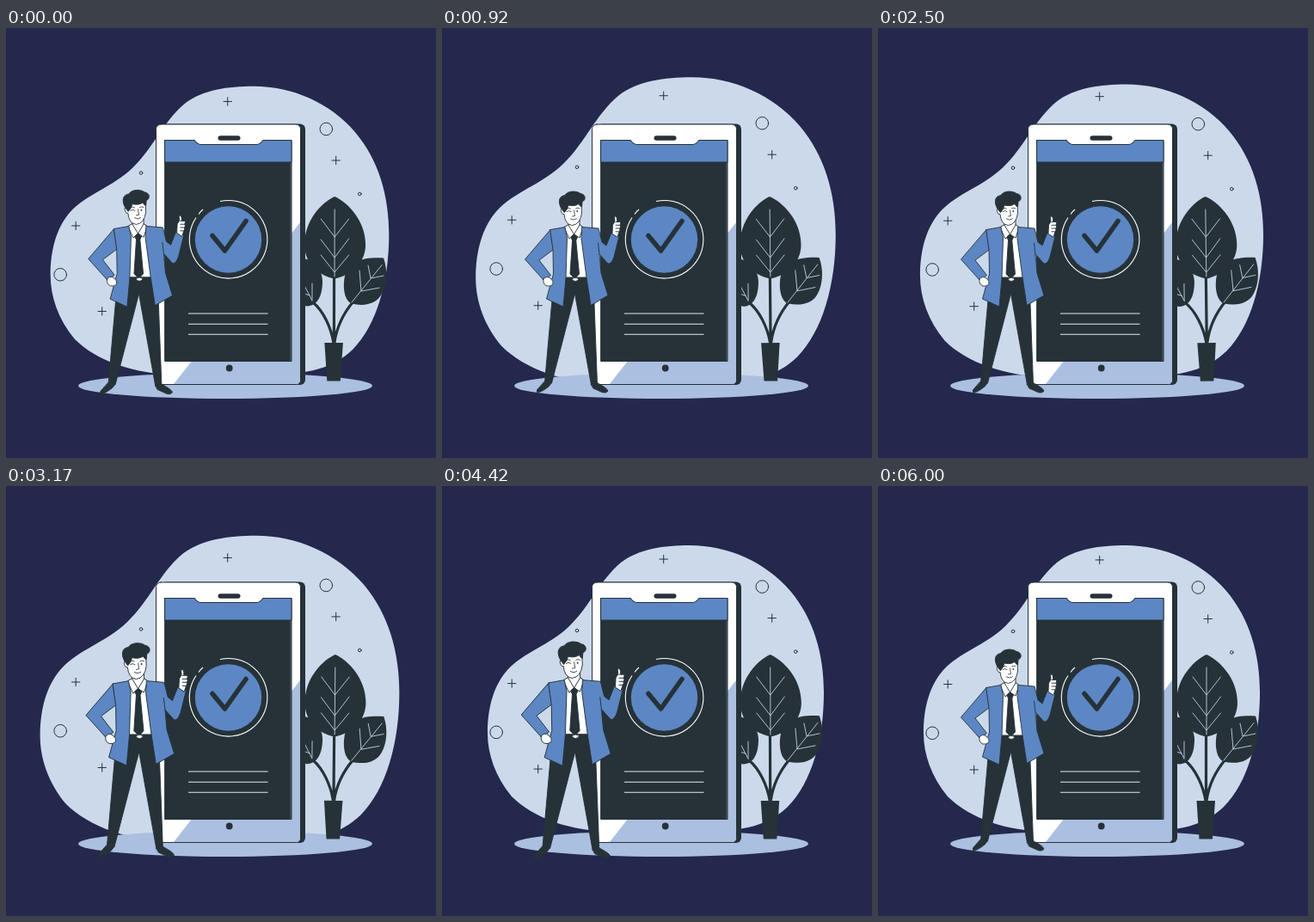
Animation of 500 by 500 pixels, one loop 6.04 s. Source, as an HTML page:

```html
<!DOCTYPE html>
<html lang="en">
<head>
<meta charset="utf-8">
<title>Payment confirmed</title>
<style>
  html, body { margin: 0; width: 100%; height: 100%; overflow: hidden; background: #24284c; }
  svg { display: block; width: 100%; height: 100%; }
  .dark { fill: #263238; }
  .blue { fill: #5c87c4; }
  .white { fill: #fff; }
  .ink { stroke: #263238; stroke-linejoin: round; stroke-linecap: round; }
  .line { fill: none; stroke: #263238; stroke-linecap: round; stroke-linejoin: round; }
  .vein { fill: none; stroke: #ccd9eb; stroke-width: .85; stroke-linecap: round; }
</style>
</head>
<body>
<svg viewBox="0 0 500 500">
  <path id="blob" fill="#ccd9eb" d="M53 287C53 258 60 232 76 214C95 193 124 186 148 163C172 140 183 110 208 89C229 73 258 69 288 69C332 69 376 88 405 122C432 154 444 195 444 240C444 294 430 345 402 373C380 394 352 402 300 402H200C150 402 106 386 81 361C62 338 53 312 53 287Z"/>
  <ellipse cx="255" cy="416" rx="171" ry="15" fill="#abbfe0"/>

  <g id="signs" class="line" stroke-width="1">
    <path d="M253 86h9.4M257.7 81.3v9.4M379 154.5h9.4M383.7 149.8v9.4M76.5 230.5h9.4M81.2 225.8v9.4M107 330h9.4M111.7 325.3v9.4"/>
    <circle cx="372.3" cy="118" r="7.3"/>
    <circle cx="63.2" cy="287.3" r="7.3"/>
    <circle cx="157" cy="169" r="1.8"/>
    <circle cx="411.3" cy="193.5" r="1.8"/>
  </g>

  <g id="plant">
    <path class="dark" d="M335 268C355 265 367 278 368 294C368 312 362 323 350 323.5C338 322 332 290 335 268Z"/>
    <path class="vein" d="M357 319L340 286M356 316V297M353 311L344 308"/>
    <path class="line" stroke-width="3.2" d="M381.5 366V285M381 366C378 348 369 329 357 319M382 366C385 345 393 331 404 318"/>
    <path class="dark" d="M382 196C396 202 418 223 418 252C418 274 400 288 382 291.5C364 288 347 274 347 252C347 223 368 202 382 196Z"/>
    <path class="vein" d="M382 211V289M366 222L382 243L398.5 222M366 246L382 267L398.5 245M366 264L382 284L398.5 264"/>
    <path class="dark" d="M439 267.5C416 266 399 271 394 288C391 303 394 317 402 320.5C417 324 431 321 437 309C443 298 444 282 439 267.5Z"/>
    <path class="vein" d="M402 319L437 275.5M411 282L413 306L434 302M421 276L424 291L439 288"/>
    <path class="dark" d="M370.5 366H392L389 410.5H373.5Z"/>
  </g>

  <g id="phone">
    <rect class="dark" x="180" y="111.5" width="168" height="303.5" rx="6"/>
    <rect class="white ink" x="174.5" y="112" width="168" height="302.5" rx="5.5"/>
    <path fill="#abbfe0" d="M195 414L342 226V409Q342 414 337 414Z"/>
    <rect class="dark ink" x="185" y="130.5" width="147" height="257"/>
    <path class="blue ink" d="M185 130.5H219Q222 135.5 227 135.5H291Q296 135.5 299 130.5H332V156H185Z"/>
    <path class="white" d="M219.5 129.9H298.5Q295.5 135 291 135H227Q222.5 135 219.5 129.9Z"/>
    <path d="M331 157V387" stroke="#66727f" stroke-width=".7"/>
    <rect class="dark" x="246.5" y="125.2" width="26" height="5.6" rx="2.8"/>
    <circle class="dark" cx="259.7" cy="395.5" r="3.9"/>
    <circle class="blue" cx="258.5" cy="246" r="38.7"/>
    <path d="M249 201.5A45.3 45.3 0 1 1 221 220.5M224 216.5Q226 213.5 229 211" fill="none" stroke="#fff" stroke-width="1.1"/>
    <path class="line" stroke-width="5.6" d="M240 241.5L254.5 259L279 224.5"/>
    <path d="M212 332H304.5M212 344.2H304.5M212 356.2H304.5" stroke="#e6e8ea" stroke-width="1.1"/>
  </g>

  <g id="man" class="ink" stroke-width=".9">
    <path class="dark" d="M130 290H172L177 320L180.5 414L173.5 415L154.5 309L127.5 413L119.5 412L128 316Z"/>
    <path class="dark" d="M119.5 411L127.5 412.5L124 417C120 420 115 424 110.5 423.5Q109.5 421 112 419Z"/>
    <path class="dark" d="M173.5 414L180.5 412.5C186 416 191 418 193 422Q191 425 186 423.5L176 419Z"/>
    <path class="white" d="M144 231L153 235L162 230L169 290H143Z"/>
    <path class="white" d="M147 222V232L153.5 243L160 231V222Z"/>
    <path class="white" d="M147 229L153.5 240L148 245L142 232ZM160 229L153.5 240L160 244L164 232Z"/>
    <path class="dark" d="M149.8 243L153.5 239.5L157.5 243L155.8 247L159.5 286L154.5 291.5L149 286L151.5 247Z"/>
    <path class="white" d="M151 291.5Q155 289 159 291.5Q158 294.5 155 294.5Q152 294.5 151 291.5Z"/>
    <path class="blue" d="M126 234.5L96.5 269L118.5 293.5L126.5 287.5L113 270L129 258Z"/>
    <path class="blue" d="M126 234.5L143 231.5L145.5 244L144 291L141 324L121.5 315L129.5 286L129 258Z"/>
    <path class="blue" d="M163 231.5L182 233L186 249L191 253L197 238L206 242L200 266Q197 275 193 274L183 263L185 285L193 311L173 322.5L168 290L162 245Z"/>
    <path class="line" d="M183 263L181.5 250"/>
    <path class="white" d="M118 292Q121 287.5 126 291Q130 294 129 298Q126 301 122 300Q117 298 118 292Z"/>
    <path class="white" d="M198 239L198.5 229L201 225L200.5 220Q202.5 217.5 203.5 222L203.5 225L207 225Q208.5 227 207 229Q208.5 231 206.8 233Q207.5 235 206 237L204 243Z"/>
    <path class="line" d="M202 225.5H206.5M202 229.3H207M202 233H206.5M202 236.8H205.5"/>
    <path class="white" d="M140 210Q137 210 139 214.5Q140 217.5 142 216.5Q143 228.5 151.5 229.5Q161 228 162.5 215L162 203H143Z"/>
    <path class="dark" d="M139.5 211C136 206 133.500 196 143 194.500C146 189 157 189 161 192.500C167 193 168 200 163 202L162.500 208Q160 207 159 204.500C155 207 151 207 147 206Q146 211 142.500 214.500Z"/>
    <path class="line" stroke-width=".8" d="M145 213.5Q147.500 211.500 150 213.5M155.5 209.8Q157.500 208.300 160 209.8M145 210Q147.500 208.500 149.500 210M153.5 212L154.5 218.5L151.500 219M149.500 222Q153 224.500 156.500 221.800"/>
    <circle class="dark" cx="157.3" cy="213" r=".9" stroke="none"/>
  </g>
</svg>
<script>
const LOOP = 6040, CYCLE = 6000, LEAD = 40;
const el = id => document.getElementById(id);
const blob = el('blob'), signs = el('signs'), plant = el('plant'), man = el('man');

// Linear interpolation through [progress, value] stops.
function track(p, stops) {
  const i = stops.findIndex(s => s[0] >= p);
  if (i < 1) return stops[0][1];
  const [a, va] = stops[i - 1], [b, vb] = stops[i];
  return va + (vb - va) * (p - a) / (b - a);
}

const BEAT = [[0, 1], [.1, 1.1], [.3, 1], [.4, 1], [.5, 1.1], [.6, 1], [1, 1]];
const WIND = [[0, 0], [.25, 1], [.75, -1], [1, 0]];
const FLOAT = [[0, 0], [.5, -10], [1, 0]];

function setScale(node, s, x, y) {
  node.setAttribute('transform', `translate(${x} ${y}) scale(${s}) translate(${-x} ${-y})`);
}

function draw(now) {
  const time = ((now % LOOP) * CYCLE / LOOP + LEAD) % CYCLE;
  const phase = period => time % period / period;
  setScale(blob, track(phase(6000), BEAT), 248.5, 235);
  setScale(man, track(phase(3000), BEAT), 152, 307);
  plant.setAttribute('transform', `rotate(${track(phase(1500), WIND)} 386 303)`);
  signs.setAttribute('transform', `translate(0 ${track(phase(1500), FLOAT)})`);
}

const start = performance.now();
function tick() {
  draw(performance.now() - start);
  requestAnimationFrame(tick);
}
tick();
</script>
</body>
</html>
```
